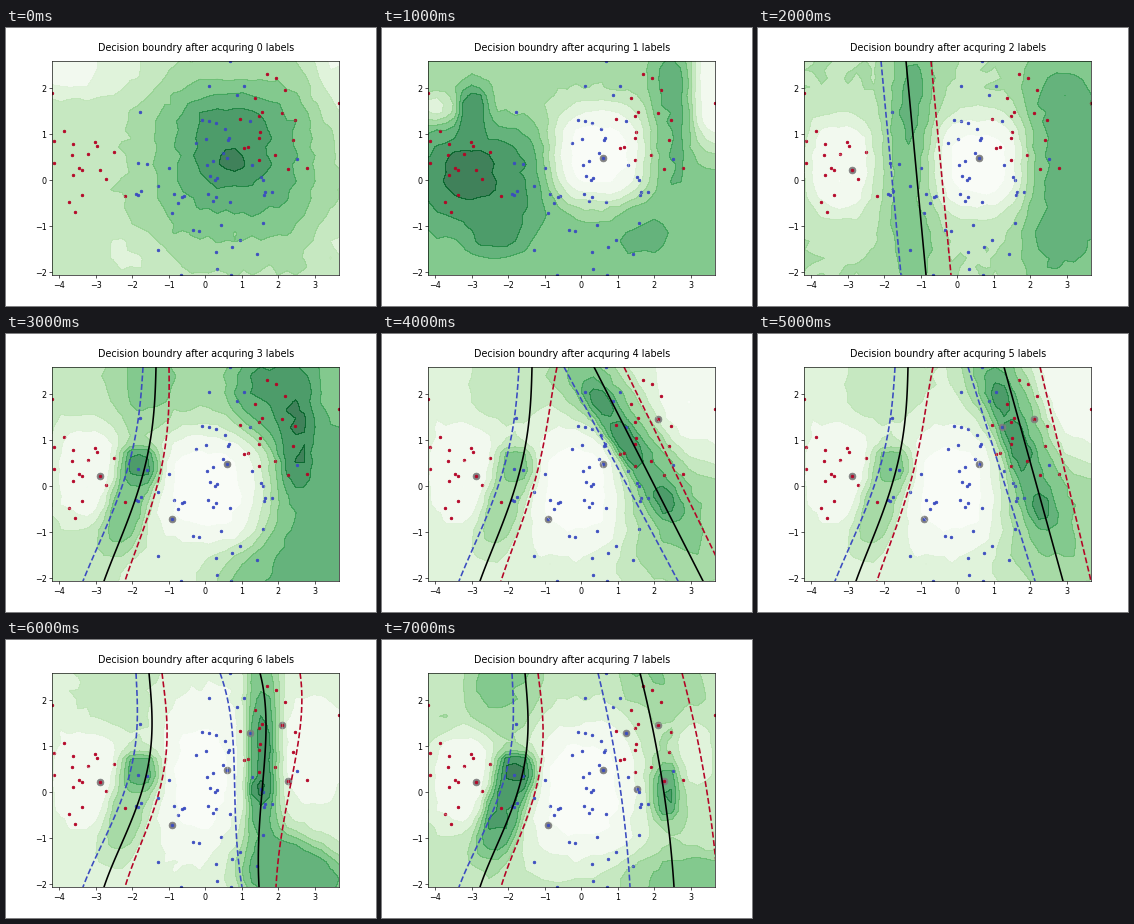
A matplotlib script that plays this animation: 370 by 278 pixels, repeating every 8000 ms.

```python
import matplotlib.pyplot as plt
import numpy as np
from matplotlib.animation import FuncAnimation

DPI = 57.8125
LEFT, RIGHT, TOP, BOTTOM = 46.25, 333, 33.36, 247.42
STEPS = 8
BLUE, RED = "#3b4cc0", "#b40426"


def to_data(x, y):
    """Stage pixels to plot units."""
    return (np.asarray(x) - 199.2) / 36.5, (152 - np.asarray(y)) / 46


def points(text):
    flat = np.array(text.replace(",", " ").split(), float)
    return to_data(flat[::2], flat[1::2])


blues = points(
    "224,33 203,58 238,58 231,67 134,84 196,92 203,93 210,95 244,93 219,101 "
    "190,115 200,111 222,112 223,110 217,125 221,130 207,133 201,137 132,135 "
    "141,136 163,140 246,137 291,131 204,148 211,150 209,152 255,149 257,152 "
    "152,158 135,163 132,167 130,166 168,166 178,168 176,169 172,175 202,166 "
    "210,169 207,173 224,174 259,164 266,164 258,167 166,185 187,202 193,203 "
    "215,197 257,195 152,222 210,224 234,212 226,219 251,226 211,241 175,247 "
    "225,247")
reds = points(
    "46,65 58,103 48,113 67,116 89,114 91,118 66,127 82,126 108,124 48,135 "
    "94,142 73,140 76,142 67,147 100,151 76,167 119,168 63,174 69,184 261,46 "
    "270,50 279,62 333,75 249,70 256,84 276,85 234,91 253,88 289,92 254,104 "
    "287,112 253,110 238,120 242,119 269,127 253,132 282,141 301,140")
labelled = points("221,130 94,142 166,185 276,85 244,93 282,141 255,149")

# Utility surface: each patch pulls the field to a level inside a soft ellipse
# given by centre, radii and tilt in degrees.
gx, gy = np.meshgrid(np.linspace(LEFT, RIGHT, 34), np.linspace(TOP, BOTTOM, 26))
grain = np.random.default_rng(4).normal(0, .11, gx.shape)


def field(ground, patches):
    z = np.full(gx.shape, float(ground))
    for level, cx, cy, rx, ry, *tilt in patches:
        a = np.radians(tilt[0] if tilt else 0)
        dx, dy = gx - cx, gy - cy
        u = (dx * np.cos(a) + dy * np.sin(a)) / rx
        v = (dy * np.cos(a) - dx * np.sin(a)) / ry
        d = (abs(u) ** 3 + abs(v) ** 3) ** (1 / 3)
        z += (level - z) / (1 + d ** 6)
    return np.clip(z + grain, -.9, 7.9)


def left_side(low, high):
    """Pale pool round the left labels and the ridge beside it."""
    return [(.2, 82, 138, 32, 48), (low, 121, 172, 19, 48, 18),
            (high, 134, 131, 17, 18)]


def centre(cx, cy, rx, ry):
    return [(.5, cx, cy, rx, ry), (-.5, cx, cy, rx * .6, ry * .6)]


def no_labels():
    return field(2.5, [
        (1.4, 115, 40, 55, 33), (.3, 60, 36, 32, 26),
        (1.4, 335, 50, 35, 50), (.3, 333, 42, 20, 32),
        (1.5, 130, 225, 30, 22), (1.5, 326, 215, 20, 22),
        (3.5, 225, 135, 88, 100), (4.5, 226, 135, 74, 74),
        (5.5, 232, 128, 60, 56), (6.5, 225, 118, 38, 42), (7.6, 225, 132, 12, 11)])


def one_label():
    return field(4.5, [
        (3.5, 150, 45, 125, 50), (1.5, 48, 80, 32, 14), (.2, 335, 60, 25, 58),
        (6.5, 105, 152, 72, 48), (6.5, 91, 88, 15, 30), (6.5, 115, 200, 26, 24),
        (7.6, 88, 146, 25, 24), (5.5, 288, 95, 18, 75), (5.5, 258, 195, 26, 30),
        *centre(217, 125, 49, 52)])


def two_labels():
    return field(3, [
        (4.5, 155, 140, 26, 130), (5.5, 155, 90, 14, 60), (5.5, 305, 140, 45, 120),
        (.2, 82, 138, 32, 48), *centre(221, 135, 46, 52)])


def three_labels():
    return field(2.5, [
        (3.5, 165, 50, 68, 48), (4.5, 143, 50, 25, 52),
        (5.5, 325, 150, 68, 160), (5.5, 285, 230, 66, 44), (6.5, 270, 68, 44, 46),
        (7.5, 289, 108, 15, 44), (4.5, 336, 45, 24, 48),
        *centre(200, 155, 60, 64), (1.5, 150, 240, 42, 20), *left_side(4.5, 6.3)])


def diagonal(tilt, middle):
    """Second ridge along the right boundary, leaning by tilt."""
    a = np.radians(tilt)

    def along(s):
        return middle + s * np.cos(a), 110 + s * np.sin(a)

    return field(1.5, [
        (2.5, 130, 55, 42, 46), (3.5, 300, 195, 72, 60), (.2, 318, 62, 46, 46),
        (4.5, *along(-5), 112, 34, tilt), *centre(192, 155, 52, 70),
        (5.5, *along(0), 85, 14, tilt), (6.5, *along(-50), 17, 9, tilt),
        (6.6, *along(0), 24, 10, tilt), (6.3, *along(68), 18, 11, tilt),
        *left_side(3.5, 4.5)])


def six_labels():
    return field(1.5, [
        (2.5, 118, 55, 48, 44), *centre(195, 140, 46, 92), (.4, 305, 110, 32, 55),
        (4.5, 257, 120, 16, 160), (5.5, 290, 237, 58, 38, 28),
        (6.4, 256, 118, 10, 56), (7.5, 254, 150, 8, 8), *left_side(3.5, 5.5)])


def seven_labels():
    return field(2.5, [
        (4.5, 122, 55, 36, 44), (3.5, 60, 85, 14, 16),
        (3.5, 285, 60, 40, 38), (6, 262, 42, 18, 20), (3.5, 275, 110, 20, 90, -12),
        (4.5, 300, 236, 72, 22), *centre(200, 150, 62, 78),
        (1.5, 312, 112, 18, 34), (6, 284, 152, 12, 26), *left_side(6, 7.2)])


surfaces = [no_labels(), one_label(), two_labels(), three_labels(),
            diagonal(57, 246), diagonal(70, 260), six_labels(), seven_labels()]

# Decision lines: the black one through evenly spaced heights, with dashed
# neighbours at a distance that changes linearly from top to bottom.
line_y = np.linspace(33, 248, 90)
drop = (line_y - 33) / 214
curves = [[] for _ in range(STEPS)]


def boundary(steps, xs, gap_top, gap_bottom, flare=0):
    fit = np.polyfit(np.linspace(0, 1, len(xs)), xs, len(xs) - 1)
    black = np.polyval(fit, drop)
    gap = gap_top + (gap_bottom - gap_top) * drop
    bend = flare * (1 - drop) ** 4
    for step in steps:
        for x, color, style in ((black, "k", "-"),
                                (black - gap, BLUE if gap_top > 0 else RED, "--"),
                                (black + gap, RED if gap_top > 0 else BLUE, "--")):
            shift = bend if color == RED else 0
            x = np.where(gap > 0, x, x) + shift
            curves[step].append((to_data(x, line_y), color, style))


def mirrored(steps, xs, gap_top, gap_bottom):
    """Same lines with the red side on the left."""
    boundary(steps, xs, -gap_top, -gap_bottom)
    for step in steps:
        black, blue, red = curves[step][-3:]
        curves[step][-3:] = [black, (blue[0], RED, "--"), (red[0], BLUE, "--")]


boundary([2], [148, 168], 25, 25)
boundary([3], [150, 147, 137, 119, 98], 13, 21)
boundary([4, 5], [150, 147, 137, 119, 98], 13, 21, flare=12)
boundary([6, 7], [143, 146, 139, 120, 98], 13, 21)
mirrored([4], [212, 321], 30, 25)
mirrored([5], [246, 305], 36, 28)
mirrored([6], [254, 260, 257, 253, 253], 40, 17)
mirrored([7], [258, 280, 292], 42, 44)

fig = plt.figure(figsize=(370.01 / DPI, 278.01 / DPI), dpi=DPI, facecolor="white")
ax = fig.add_axes([.125, .11, .775, .77])


def draw(step):
    ax.clear()
    grid = to_data(gx, gy)
    shades = dict(levels=range(-1, 9), cmap="Greens", vmin=0, vmax=8, alpha=.75)
    ax.contourf(*grid, surfaces[step], **shades)
    ax.contour(*grid, surfaces[step], linewidths=.6, linestyles="-", **shades)
    ax.scatter(labelled[0][:step], labelled[1][:step], s=70, c="gray", zorder=1.5)
    for (x, y), color in ((blues, BLUE), (reds, RED)):
        ax.scatter(x, y, s=10, c=color, zorder=1.6)
    for (x, y), color, style in curves[step]:
        ax.plot(x, y, color=color, ls=style, lw=2, zorder=2)
    ax.text(.5, 1.05, f"Decision boundry after acquring {step} labels", size=12,
            ha="center", transform=ax.transAxes)
    left, top = to_data(LEFT, TOP)
    right, bottom = to_data(RIGHT, BOTTOM)
    ax.set(xlim=(left, right), ylim=(bottom, top),
           xticks=range(-4, 4), yticks=range(-2, 3))
    return []


anim = FuncAnimation(fig, draw, frames=STEPS, init_func=lambda: draw(0),
                     interval=1000, repeat=True, repeat_delay=0)
plt.show()
```
